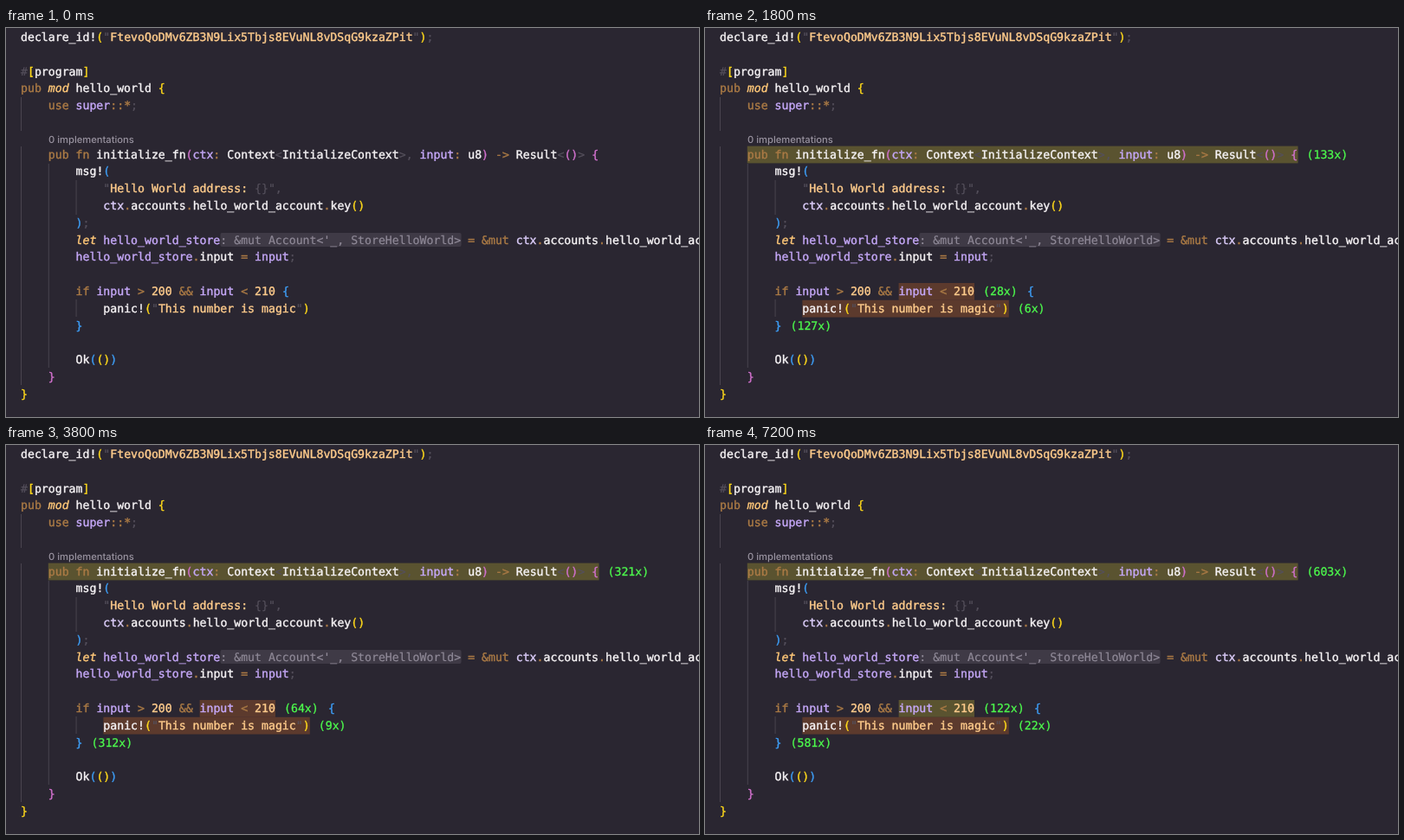
Write an HTML page that moves like this. It is 800x450 px and loops after 7.3 s.

```html
<!DOCTYPE html>
<html lang="en">
<head>
<meta charset="utf-8">
<title>Coverage counters</title>
<style>
html, body { margin: 0; width: 100%; height: 100%; overflow: hidden; background: #2a2631; }
svg { display: block; width: 800px; height: 450px; }
text { font: 13.2px "DejaVu Sans Mono", monospace; white-space: pre; text-rendering: geometricPrecision; }
tspan { fill: currentColor; stroke: currentColor; stroke-width: .4px; }
.w { color: #f6f3f5 }
.k { color: #aa7a45 }
.i { color: #ffc878; font-style: italic }
.s { color: #ffcc8c }
.p { color: #c5a8f8 }
.c { color: #dccdfa }
.d { color: #55505c; stroke-width: .2px }
.y { color: #ffd91a }
.o { color: #d070cc }
.b { color: #3d9df5 }
.h { color: #8f8997; stroke-width: .2px }
.g { color: #4dfb4d; stroke-width: .3px }
.lens { font: 500 11.2px Inter, sans-serif; fill: #98929f }
</style>
</head>
<body>
<svg id="stage" viewBox="0 0 800 450"></svg>
<script>
const CELL = 7.947, ROW = 19.8, LOOP = 7300, STEP = 100, WARM = 100;
const stage = document.getElementById('stage');
const colX = col => 17 + col * CELL;
const rowY = row => row < 6 ? 15 + row * ROW : 150.6 + (row - 6) * ROW;

function add(tag, attrs) {
  const el = document.createElementNS('http://www.w3.org/2000/svg', tag);
  for (const key in attrs) el.setAttribute(key, attrs[key]);
  return stage.appendChild(el);
}

function box(col, row, length) {
  return add('rect', { x: colX(col), y: rowY(row) - 14, width: length * CELL, height: ROW });
}

// Each ~ starts a run; the letter after it is its colour class.
function code(col, row, runs) {
  const line = add('text', { x: colX(col), y: rowY(row) });
  for (const run of runs.split('~').slice(1)) {
    const span = document.createElementNS(line.namespaceURI, 'tspan');
    span.setAttribute('class', run[0]);
    span.textContent = run.slice(1);
    line.append(span);
  }
  return line;
}

// Indent guides: column, top, bottom
for (const [col, top, bottom] of [[0, 80, 119], [0, 137, 413], [4, 157, 393], [8, 176, 216], [8, 314, 334]])
  add('rect', { x: colX(col), y: top, width: 1, height: bottom - top, fill: '#49444f' });

const marks = [[4, 6, 80], [26, 14, 11], [12, 15, 30]].map(m => box(...m));
add('rect', { x: colX(29), y: 237, width: 35 * CELL, height: 16, rx: 2, fill: '#3f3a46' });

code(0, 0, '~wdeclare_id!~y(~d"~sFtevoQoDMv6ZB3N9Lix5Tbjs8EVuNL8vDSqG9kzaZPit~d"~y)~d;');
code(0, 2, '~d#~y[~wprogram~y]');
code(0, 3, '~kpub ~imod ~whello_world ~y{');
code(4, 4, '~kuse ~psuper~k::*~d;');
add('text', { x: 49, y: 132.8, class: 'lens' }).textContent = '0 implementations';
code(4, 6, '~kpub fn ~winitialize_fn~o(~pctx~k: ~wContext~d<~wInitializeContext~d>, ~pinput~k: ~wu8~o) ~k-> ~wResult~d<~o()~d> ~o{');
code(8, 7, '~wmsg!~b(');
code(12, 8, '~d"~sHello World address: ~d{}",');
code(12, 9, '~cctx~k.~waccounts~k.~whello_world_account~k.~wkey~y()');
code(8, 10, '~b)~d;');
code(8, 11, "~ilet ~phello_world_store~h: &mut Account<'_, StoreHelloWorld>~k = &mut ~cctx~k.~waccounts~k.~whello_world_account~d;");
code(8, 12, '~phello_world_store~k.~winput ~k= ~pinput~d;');
code(8, 14, '~kif ~pinput ~k> ~s200 ~k&& ~pinput ~k< ~s210');
const brace = code(38, 14, '~b{');
code(12, 15, '~wpanic!~y(~d"~sThis number is magic~d"~y)');
code(8, 16, '~b}');
code(8, 18, '~wOk~b(~y()~b)');
code(4, 19, '~o}');
code(0, 20, '~y}');

const labels = [[84, 6], [37, 14], [42, 15], [9, 16]].map(([col, row]) => {
  const label = code(col, row, '~g');
  label.setAttribute('x', colX(col) + 10);
  return label.firstChild;
});

// Time, then runs of the function, the condition and the panic
const samples = [
  [1000, 54, 13, 3], [1200, 74, 18, 4], [2400, 192, 39, 8], [3800, 321, 64, 9],
  [5200, 407, 81, 14], [6200, 495, 98, 18], [7200, 603, 122, 22]
];

function countsAt(time) {
  if (time < samples[0][0]) return [0, 0, 0];
  const next = Math.max(1, samples.findIndex(s => s[0] >= time));
  const a = samples[next - 1], b = samples[next];
  const part = (time - a[0]) / (b[0] - a[0]);
  return [1, 2, 3].map(i => Math.floor(a[i] + (b[i] - a[i]) * part + 1e-6));
}

function draw(now) {
  const time = Math.floor(now % LOOP / STEP) * STEP;
  const counts = countsAt(time);
  marks.forEach((mark, i) =>
    mark.setAttribute('fill', !counts[i] ? 'none' : counts[i] < WARM ? '#5c3a2d' : '#5a5330'));
  const shown = [...counts, counts[0] - counts[2]].map(n => n ? `(${n}x)` : '');
  labels.forEach((label, i) => label.textContent = shown[i]);
  const shift = shown[1] ? shown[1].length * CELL + 13.3 : 0;
  brace.setAttribute('x', colX(38) + shift);
  requestAnimationFrame(draw);
}
draw(0);
</script>
</body>
</html>
```
